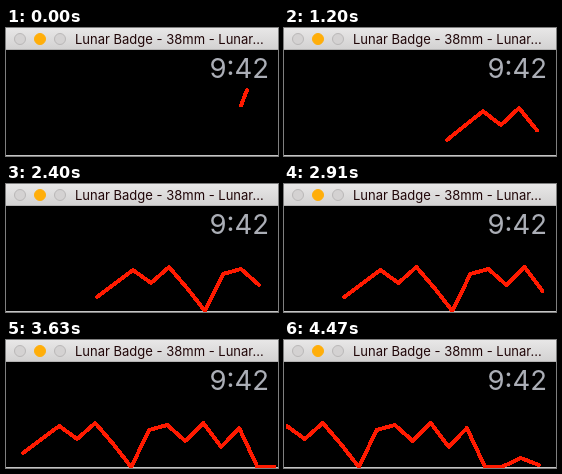
An HTML page for the animation above (4.53 s loop, 272 by 128 pixels).

```html
<!DOCTYPE html>
<html lang="en">
<head>
<meta charset="utf-8">
<title>Watch graph</title>
<style>
  html, body { margin: 0; width: 100%; height: 100%; overflow: hidden; background: #000; }
  svg { display: block; width: 272px; height: 128px; }
  text { font-family: Inter, "Open Sans", sans-serif; }
</style>
</head>
<body>
<svg viewBox="0 0 272 128">
  <defs>
    <linearGradient id="bar" x2="0" y2="1">
      <stop stop-color="#e8e7e7"/>
      <stop offset="1" stop-color="#d2d1d1"/>
    </linearGradient>
    <clipPath id="plot"><rect x="2" y="22" width="268" height="106"/></clipPath>
  </defs>
  <rect width="272" height="128"/>
  <rect y="127" width="272" height="1" fill="#c4c4c4"/>
  <rect width="272" height="22" fill="url(#bar)"/>
  <rect y="21" width="272" height="1" fill="#b4b3b3"/>
  <g fill="#d4d2d2" stroke="#bab8b8">
    <circle cx="14" cy="11" r="5.5"/>
    <circle cx="34" cy="11" r="5.5" fill="#ffae0a" stroke="#ffae0a"/>
    <circle cx="54" cy="11" r="5.5"/>
  </g>
  <text x="69" y="16" font-size="13" fill="#200608">Lunar Badge - 38mm - Lunar…</text>
  <text x="263" y="50" font-size="27.5" font-weight="400" text-anchor="end" fill="#abaeb6">9:42</text>
  <g clip-path="url(#plot)">
    <polyline id="line" fill="none" stroke="#ff1a00" stroke-width="4" stroke-linejoin="round" stroke-linecap="round" shape-rendering="crispEdges"/>
  </g>
</svg>
<script>
  const LOOP = 4530, TICK = 30, STEP = 18, SPEED = 0.06;
  const START_X = 235, RIGHT = 270, BASE = 128;
  const line = document.getElementById('line');

  // Settled height of each sample above the baseline
  const heights = [15, 19.6, 42, 29, 45, 24, 1, 38, 43, 27, 45, 21, 40, 1.5, 1.5, 10, 3];
  const offset = i => i === 1 ? 6 : i * STEP;

  // Vertical zoom shrinks in jumps as the first samples arrive
  const zooms = [[30, 3.37], [630, 1.8], [930, 1.3], [1230, 1.067], [Infinity, 1]];
  const zoomAt = t => zooms.find(([end]) => t < end)[1];

  function draw(now) {
    const t = Math.min(Math.floor(now % LOOP / TICK) * TICK, LOOP - 2 * TICK);
    const zoom = zoomAt(t);
    line.setAttribute('points', heights
      .map((h, i) => [START_X + offset(i) - SPEED * t, BASE - h * zoom])
      .filter(([x]) => x < RIGHT)
      .map(p => p.join())
      .join(' '));
  }

  const start = performance.now();
  function frame() {
    draw(performance.now() - start);
    requestAnimationFrame(frame);
  }
  frame();
</script>
</body>
</html>
```
